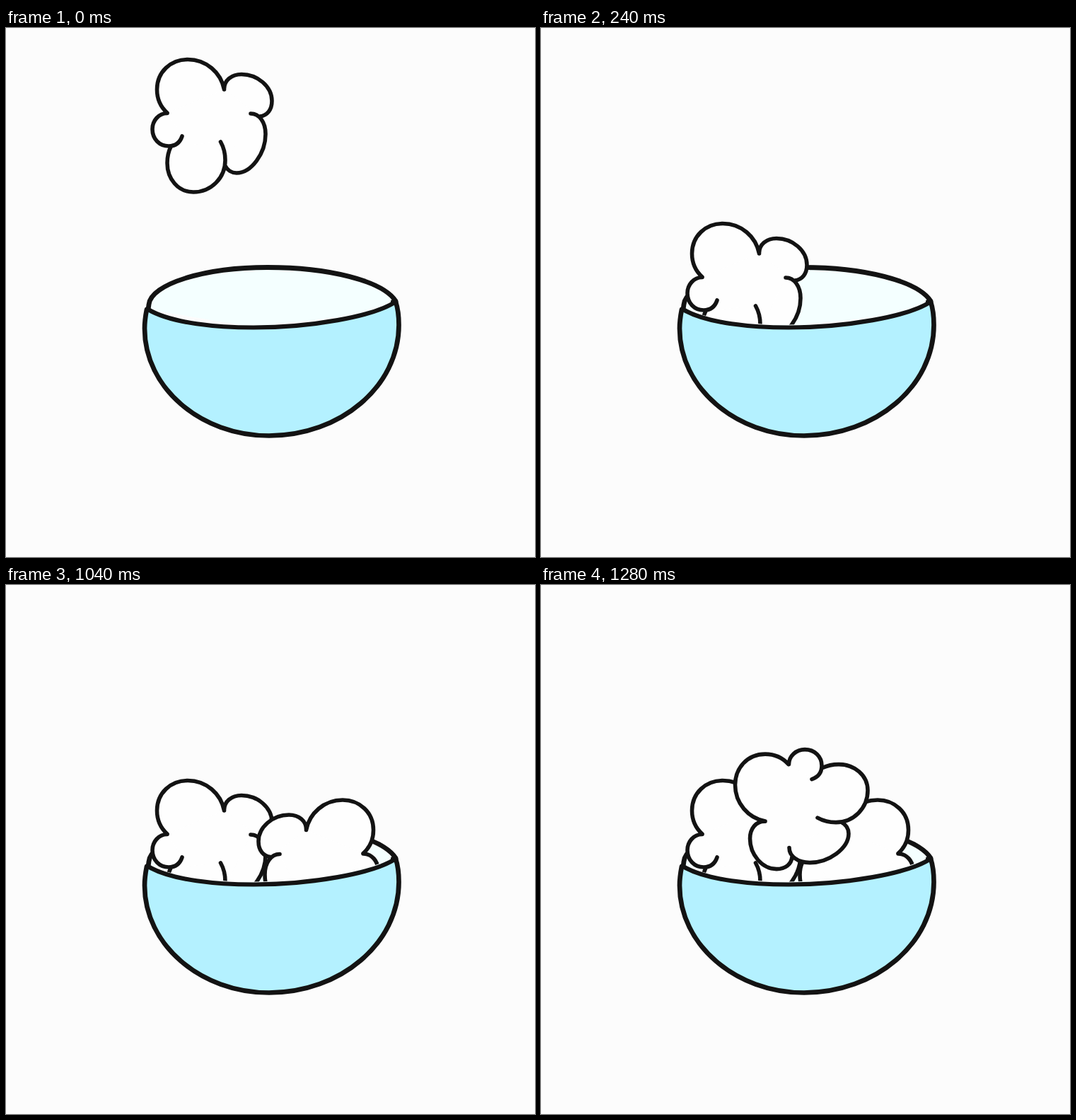
Animation of 748x748 px, one loop 1600 ms. Source, as an HTML page:

```html
<!DOCTYPE html>
<html lang="en">
<head>
<meta charset="utf-8">
<title>Bowl</title>
<style>
  html, body { margin: 0; width: 100%; height: 100%; overflow: hidden; background: #fcfcfc; }
  svg { display: block; width: 100vw; height: 100vh; }
  .ink { stroke: #131313; stroke-linecap: round; stroke-linejoin: round; }
</style>
</head>
<body>
<svg id="stage" viewBox="0 0 748 748"></svg>
<script>
const LOOP = 1600;

const frontRim = 'C235 418 300 423.5 350 423.5 C430 423.5 520 408 551 387';
const backRim = 'M201 398 L202 391 C205 362 280 338.5 370 338.5 C455 338.5 532 357 551 386';
const side = 'C554 396 555.5 408 555.5 420 C555.5 506.4 473.3 576.5 372 576.5 ' +
  'C275 576.5 196 508.4 196 425 C196 416 197 408 199 398';

// Five lobes, all clockwise, so that their fills add up; the core fills the middle.
const lobes = [
  'M228 120 C219 112 213.5 101 213.5 87 C213.5 62 233 44.5 257 44.5 C283 44.5 304 63 308.5 87',
  'M308.5 87 C308 74 319 65.5 333 65.5 C356 65.5 376 83 376 103 C376 116 369 124 359 125',
  'M346 121 C358 121 367 133 367 150 C367 177 347 205 326 205 C319 205 313 201 310 195',
  'M303.5 161 C308 169 310 178 310 187 C310 212 290 232 265 232 C243 232 228 213 228 191 C228 182 230 174 233 168',
  'M249 153 C246 162 240 167 230 167 C217 167 207 157 207 143 C207 131 216 120.5 228 120.5'
].join(' ');
const core = 'M225 112 L280 70 L308 88 L335 80 L368 105 L355 125 L350 160 L320 195 ' +
  'L305 185 L265 210 L233 168 L220 150 L228 120 Z';

// Each puff is the same shape: placed, mirrored or transposed, then dropped in steps.
const puffs = [
  { pose: 'matrix(1 0 0 1 0 0)', steps: [[0, 0], [80, 45], [160, 138], [240, 232]] },
  { pose: 'matrix(-1 0 0 1 733 78.5)', steps: [[880, 0], [960, 98], [1040, 181]] },
  { pose: 'matrix(0 1 1 0 230 -97.4)', steps: [[1120, 0], [1200, 61], [1280, 123]] }
];

document.getElementById('stage').innerHTML = `
  <clipPath id="aboveRim">
    <path d="M0 0 V398 H201 ${frontRim} H748 V0 Z" transform="translate(0 -4)"/>
  </clipPath>
  <path d="${backRim} L551 387 V400 L350 423 Z" fill="#f4ffff"/>
  <path d="${backRim} L551 387" class="ink" fill="none" stroke-width="6.8"/>
  <g clip-path="url(#aboveRim)">
    ${puffs.map(({ pose }) => `<g class="puff"><g transform="${pose}" fill="#fefefe">
      <path d="${core}"/><path d="${lobes}" class="ink" stroke-width="5.6"/>
    </g></g>`).join('')}
  </g>
  <path d="M201 398 ${frontRim} ${side} Z" fill="#b4f1ff"/>
  <path d="M551 387 ${side}" class="ink" fill="none" stroke-width="6.7"/>
  <path d="M201 398 ${frontRim} L547 387" class="ink" fill="none" stroke-width="6.2"/>`;

const nodes = document.querySelectorAll('.puff');

function draw(time) {
  puffs.forEach(({ steps }, i) => {
    const step = steps.filter(([start]) => time >= start).pop();
    nodes[i].style.display = step ? '' : 'none';
    if (step) nodes[i].setAttribute('transform', `translate(0 ${step[1]})`);
  });
}

const began = performance.now();
function tick() {
  draw((performance.now() - began) % LOOP);
  requestAnimationFrame(tick);
}
tick();
</script>
</body>
</html>
```
